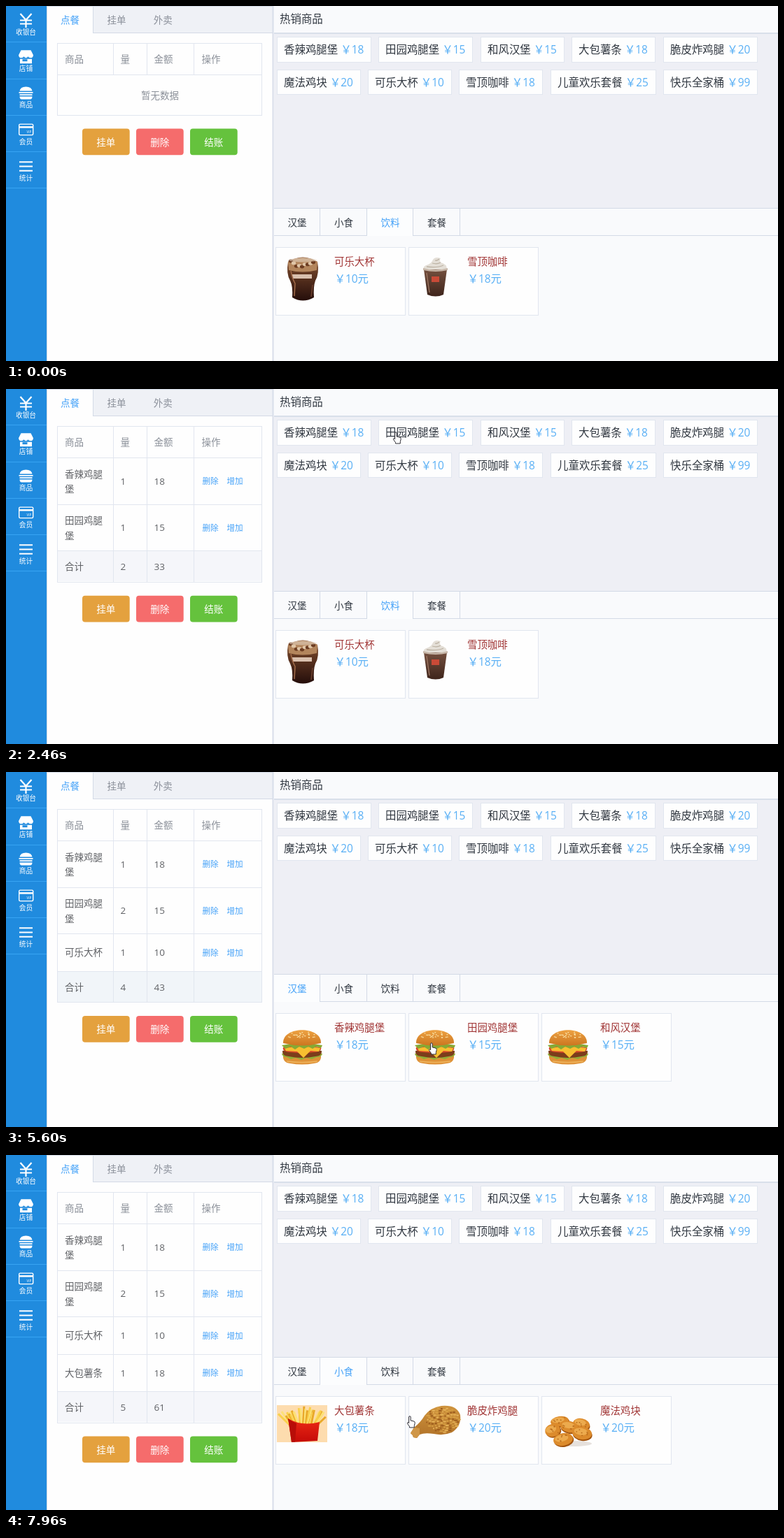
An HTML page for the animation above (8000 ms loop, 1103x508 px).

```html
<!DOCTYPE html>
<html lang="zh-CN">
<head>
<meta charset="utf-8">
<title>收银台</title>
<style>
html, body { margin: 0; width: 100%; height: 100%; overflow: hidden; background: #f9fafc; }
svg { display: block; width: 1103px; height: 508px; }
text { font-family: "Open Sans", "Noto Sans CJK SC", "Noto Sans CJK", sans-serif; white-space: pre; }
</style>
</head>
<body>
<svg id="stage" viewBox="0 0 1103 508"></svg>
<script>
const LOOP = 8000, BEAT = 156.6;
const BLUE = '#45a2f8', SKY = '#58aff5', LINE = '#e1e6ef', EDGE = '#d3dae6', INK = '#303740';

// ---- drawing helpers ----
const rect = (x, y, w, h, fill, extra = '') =>
  `<rect x="${x}" y="${y}" width="${w}" height="${h}" fill="${fill}" ${extra}/>`;
const frame = (x, y, w, h, fill = '#fefefe', stroke = LINE) =>
  rect(x + .5, y + .5, w - 1, h - 1, fill, `stroke="${stroke}"`);
const path = (d, fill, extra = '') => `<path d="${d}" fill="${fill}" ${extra}/>`;
const stroke = (d, color, width = 1, extra = '') =>
  path(d, 'none', `stroke="${color}" stroke-width="${width}" ${extra}`);
const ellipse = (x, y, rx, ry, fill) => `<ellipse cx="${x}" cy="${y}" rx="${rx}" ry="${ry}" fill="${fill}"/>`;
const at = (x, y, body) => `<g transform="translate(${x} ${y})">${body}</g>`;
const label = (x, midY, str, size, fill, anchor = 'start') =>
  `<text x="${x}" y="${midY + size * .37}" font-size="${size}" fill="${fill}" text-anchor="${anchor}">${str}</text>`;
const gradient = (id, top, bottom) =>
  `<linearGradient id="${id}" x2="0" y2="1"><stop stop-color="${top}"/><stop offset="1" stop-color="${bottom}"/></linearGradient>`;
const mix = (a, b, k) => a.map((v, i) => Math.round(v + (b[i] - v) * k));
const noise = n => { const v = Math.sin(n * 127.1) * 43758.5453; return v - Math.floor(v); };
const times = (n, fn) => Array.from({ length: n }, (_, i) => fn(i)).join('');

// ---- food pictures, each drawn from its own top left corner ----
const cola = () =>
  path('M1 7Q22 -6 43 7Q46 24 40 34Q37 42 38 58Q22 67 7 58Q8 42 4 34Q-2 24 1 7Z', 'url(#cola)') +
  path('M1 7Q22 -5 43 7L42 19Q22 24 2 19Z', '#b3855c') +
  times(9, i => ellipse(5 + i * 4, 6 + noise(i) * 9, 3.2, 2.4, i % 2 ? '#e0c6a8' : '#6d3d22')) +
  ellipse(22, 4.5, 20, 3, '#e9d9c988') +
  rect(7, 25, 28, 6, '#d9c0ae') +
  stroke('M5 20Q7 31 11 38L10 56', '#a26b4a', 1.5) + stroke('M36 40L34 57', '#6e4230', 1.5);

const coffee = () =>
  path('M1 17Q-1 12 7 10Q12 8 14 3Q17 -2 25 1Q23 3 25 7Q34 9 34 17Z', '#e4dfd7') +
  stroke('M5 13Q20 15 29 11M13 8Q20 10 25 7M17 4Q20 5 23 2', '#bcb2a4', 1.3) +
  path('M1 17H34L29 53Q18 58 6 53Z', 'url(#coffee)') +
  path('M0 15Q18 20 35 15V18Q18 22 0 18Z', '#c8b8aa') +
  rect(12, 27, 11, 8, '#c94a37') + stroke('M5 22L9 50', '#9b7460', 1.4);

const burger = () =>
  path('M2 36Q29 44 56 36Q57 47 46 48Q29 51 12 48Q1 47 2 36Z', '#de9238') +
  path('M0 34Q29 30 58 34Q57 39 50 39L43 42L35 40L28 43L20 40L13 42L7 39Q1 39 0 34Z', '#8fae36') +
  path('M1 30Q29 24 57 30Q58 37 48 38Q29 42 10 38Q0 37 1 30Z', '#7c3d1b') +
  path('M2 25Q29 20 56 25Q58 31 46 32Q29 34 12 32Q0 31 2 25Z', '#d8482a') +
  path('M4 26Q29 22 55 26L53 31L41 30L31 40L22 31L6 30Z', '#f8bf30') +
  path('M0 22Q29 16 58 22L56 26L49 24L44 27L38 24L32 27L25 24L19 28L13 24L5 27Z', '#86a934') +
  path('M2 19C1 -6 57 -6 56 19Q29 26 2 19Z', 'url(#bun)') +
  times(26, i => ellipse(9 + noise(i + 3) * 40, 3 + noise(i + 40) * 9, 1.2, .7, '#fae0a2')) +
  stroke('M7 45Q29 48 51 45', '#efb45c', 1.5);

const fries = () =>
  rect(0, 0, 72, 53, '#fddcae') +
  times(30, i => {
    const side = (i - 14.5) / 14.5, x = 38 + side * 18, lean = side * 14 + noise(i) * 8 - 4;
    return stroke(`M${x} 30L${x + lean} ${1 + side * side * 9 + noise(i + 9) * 10}`,
      ['#f9d04b', '#fce178', '#e9a929'][i % 3], 3);
  }) +
  path('M16 19Q36 31 61 24L58 51L21 53Z', 'url(#box)') + path('M16 19Q22 24 28 26L26 52.5L21 53Z', '#b80d08');

const drumstick = () =>
  path('M0 40L5 32Q14 25 20 15Q29 3 44 1Q66 -1 71 14Q73 30 59 39Q47 44 33 41Q20 39 13 42L9 47L4 46L3 43Z', 'url(#fried)') +
  path('M0 40L5 32L13 33L13 42L9 47L4 46L3 43Z', '#cf9647') +
  times(90, i => {
    const turn = i * 2.4, reach = Math.sqrt(i / 90);
    return ellipse(46 + Math.cos(turn) * reach * 24, 21 + Math.sin(turn) * reach * 18, 1 + noise(i) * 2, 1.1,
      ['#e6b258', '#9c5c1d', '#d8a044'][i % 3]);
  });

const nugget = (x, y, rx, ry, turn) => `<g transform="translate(${x} ${y}) rotate(${turn})">` +
  ellipse(1, 2, rx, ry, '#a2540f') + ellipse(0, 0, rx, ry, '#dc8b2c') + ellipse(-2, -2, rx * .7, ry * .55, '#ecaa4d') +
  times(7, i => ellipse((noise(i + x) - .5) * rx * 1.4, (noise(i + y) - .5) * ry * 1.3, 1, .8, '#b76a1b')) + '</g>';
const nuggets = () =>
  ellipse(41, 40, 27, 4, '#e6e1dd') + nugget(22, 8, 13, 7, -8) + nugget(53, 12, 12, 8, 12) +
  nugget(36, 16, 13, 8, 10) + nugget(12, 21, 11, 9, -15) + nugget(54, 25, 14, 9, 8) + nugget(27, 34, 14, 9, -10);

// ---- content ----
const price = { 香辣鸡腿堡: 18, 田园鸡腿堡: 15, 和风汉堡: 15, 大包薯条: 18, 脆皮炸鸡腿: 20,
  魔法鸡块: 20, 可乐大杯: 10, 雪顶咖啡: 18, 儿童欢乐套餐: 25, 快乐全家桶: 99 };
const hotX = [387, 532, 678, 808, 939, 387, 517, 647, 778, 939];
const hotItems = Object.keys(price).map((name, i) => ({
  name, x: hotX[i], w: Math.round(58 + name.length * 15.45), ...(i < 5 ? { y: 44, h: 37 } : { y: 91, h: 36 })
}));
const tabs = [
  { name: '汉堡', cards: [['香辣鸡腿堡', burger, 9, 23], ['田园鸡腿堡', burger, 9, 23], ['和风汉堡', burger, 9, 23]] },
  { name: '小食', cards: [['大包薯条', fries, 2, 12], ['脆皮炸鸡腿', drumstick, 3, 12], ['魔法鸡块', nuggets, 4, 27]] },
  { name: '饮料', cards: [['可乐大杯', cola, 17, 13], ['雪顶咖啡', coffee, 21, 14]] },
  { name: '套餐', cards: [] }
];
const tabX = i => Math.round(383 + i * 66.4);
const cardX = i => Math.round(385 + i * 189.8);

// ---- timeline, counted in beats ----
const orders = [['香辣鸡腿堡', 10], ['田园鸡腿堡', 14], ['可乐大杯', 22], ['大包薯条', 48]];
const extraPortion = { name: '田园鸡腿堡', beat: 33 };
const tabSwitches = [[-1, 2], [27, 0], [42, 1]];
const pointerKeys = [
  [0, 849, 147], [2, 700, 240], [4, 480, 320], [5, 369, 338], [6, 425, 300], [8, 433, 200], [10, 447, 70],
  [11, 447, 66], [13, 556, 57], [14, 556, 57], [15, 557, 62], [17, 510, 112], [18, 510, 112], [19, 530, 112],
  [22, 530, 112], [24, 515, 190], [27, 430, 303], [28, 434, 303], [29, 502, 367], [30, 502, 367],
  [32, 608, 388], [37, 608, 388], [40, 540, 345], [42, 481, 309], [44, 481, 303], [46, 430, 360],
  [48, 425, 372], [50, 577, 374]
];

function pointerAt(beat) {
  const n = pointerKeys.findIndex(k => k[0] >= beat);
  const b = pointerKeys[n], a = pointerKeys[Math.max(0, n - 1)];
  const k = a === b ? 0 : (beat - a[0]) / (b[0] - a[0]);
  return { x: a[1] + (b[1] - a[1]) * k, y: a[2] + (b[2] - a[2]) * k };
}

const inside = (p, x, y, w, h) => p.x >= x && p.x < x + w && p.y >= y && p.y < y + h;

// ---- fixed parts ----
const icons = [
  stroke('M-8 -9L0 0L8 -9M0 0V11M-8.5 .5H8.5M-8.5 5.5H8.5', '#fff', 2.2),
  path('M-7 -9H7L10.5 -2Q10 2 7 2Q4 2 3 0Q0 4 -3 0Q-4 2 -7 2Q-10 2 -10.5 -2ZM-8.5 3.5H8.5V10H-8.5Z', '#fff') +
    rect(-5, 4, 7, 3, '#208bde'),
  path('M-9 -3Q-8 -9 0 -9Q8 -9 9 -3ZM-9 5H9Q9 9 6 9H-6Q-9 9 -9 5Z', '#fff') +
    stroke('M-10 -.5H10M-9 2.8H9', '#fff', 1.7),
  `<rect x="-9.8" y="-7.5" width="20" height="15.5" rx="1.5" fill="none" stroke="#fff" stroke-width="1.4"/>` +
    rect(-9.5, -4.5, 19.5, 2.5, '#fff') + label(1, 4, 'VIP', 4.5, '#fff'),
  stroke('M-9.5 -5.5H9.5M-9.5 .7H9.5M-9.5 6.9H9.5', '#fff', 2)
];

function fixedParts() {
  const side = ['收银台', '店铺', '商品', '会员', '统计'].map((name, i) =>
    at(28.5, 20 + i * 52.2, icons[i]) + label(28.5, 37.5 + i * 52.2, name, 9.7, '#fff', 'middle') +
    rect(0, Math.round(51.4 + i * 52.2), 58, 1, '#37a4f3')).join('');
  const leftTabs = ['点餐', '挂单', '外卖'].map((name, i) =>
    label(78 + i * 66.4, 20.5, name, 13.5, i ? '#8c919b' : BLUE)).join('');
  const hot = hotItems.map(({ name, x, y, w, h }) =>
    frame(x, y, w, h) + label(x + 10, y + h / 2, name, 15.45, INK) +
    label(x + 14 + name.length * 15.45, y + h / 2, '￥' + price[name], 15.45, SKY)).join('');
  return '<defs>' + gradient('cola', '#85502f', '#250e0b') + gradient('coffee', '#74503f', '#3e241b') +
    gradient('bun', '#eda243', '#cc7620') + gradient('box', '#ec2a15', '#c50a08') +
    gradient('fried', '#cf943e', '#b07127') + '</defs>' +
    rect(0, 0, 1103, 508, '#f9fafc') +
    rect(58, 0, 323, 508, '#fefefe') + rect(58, 0, 323, 38, '#eff1f6') +
    rect(58, 0, 323, 1, EDGE) + rect(125, 38, 256, 1, EDGE) +
    rect(58, 1, 66, 38, '#fefefe') + rect(124, 0, 1, 39, EDGE) + leftTabs +
    rect(0, 0, 58, 508, '#208bde') + side + rect(58, 0, 1, 508, EDGE) +
    rect(383, 39, 720, 250, '#eeeff5') + rect(383, 38, 720, 2, '#d9dfea') +
    rect(380.5, 0, 2, 508, '#d8dde9') +
    label(391, 18.5, '热销商品', 15.45, INK) + hot;
}

// ---- changing parts ----
function orderTable(beat) {
  const rows = orders.filter(o => beat >= o[1]).map(([name]) => ({
    name, sum: price[name], count: name === extraPortion.name && beat >= extraPortion.beat ? 2 : 1
  }));
  const columns = [84, 163.5, 211.5, 279.5], total = key => rows.reduce((n, r) => n + r[key], 0);
  const cells = (y, values, fill) => values.map((v, i) => label(columns[i], y, v, 13.5, fill)).join('');
  const rule = y => rect(73, Math.round(y), 293, 1, LINE);
  let y = 98.2, out = cells(76.5, ['商品', '量', '金额', '操作'], '#8b9099') + rule(53) + rule(y);
  for (const { name, count, sum } of rows) {
    const wraps = name.length > 4, h = wraps ? 66.6 : 53.4, mid = y + h / 2 + .3;
    out += cells(mid, [wraps ? '' : name, count, sum], '#606266') +
      label(280.5, mid, '删除', 11.6, BLUE) + label(315.5, mid, '增加', 11.6, BLUE);
    if (wraps) out += label(84, mid - 10, name.slice(0, 4), 13.5, '#606266') +
      label(84, mid + 11.5, name.slice(4), 13.5, '#606266');
    y += h;
    out += rule(y);
  }
  if (rows.length) {
    out = rect(73, Math.round(y), 293, 44, rows.length === 3 ? '#f1f5f9' : '#f5f6fa') + out +
      cells(y + 23, ['合计', total('count'), total('sum')], '#606266');
    y += 44.4;
  } else {
    out += label(220, 128.5, '暂无数据', 13.5, '#8b9099', 'middle');
    y += 57.4;
  }
  const bottom = Math.round(y), lineEnd = rows.length ? bottom : 98;
  out += rule(bottom) + [73, 365].map(x => rect(x, 53, 1, bottom - 52, LINE)).join('') +
    [153, 201, 268].map(x => rect(x, 53, 1, lineEnd - 53, LINE)).join('');
  return out + [['挂单', '#e4a13e'], ['删除', '#f56c6c'], ['结账', '#65c23d']].map(([name, fill], i) =>
    rect(109 + i * 77, y + 19.9, 67.7, 37.7, fill, 'rx="4"') +
    label(142.7 + i * 77, y + 39.2, name, 13.5, '#fff', 'middle')).join('');
}

function menu(beat, pointer) {
  const current = tabSwitches.filter(s => beat >= s[0]);
  const [since, active] = current[current.length - 1];
  const previous = current.length > 1 ? current[current.length - 2][1] : -1;
  let out = rect(383, 289, 720, 1, EDGE) + rect(383, 328, 720, 1, EDGE);
  tabs.forEach(({ name }, i) => {
    const x = tabX(i), right = tabX(i + 1);
    const lit = i === active || (pointer && inside(pointer, x, 290, right - x, 38));
    const fade = lit ? 0 : i === previous ? Math.min(1, (beat - since) / 2) : 1;
    if (i === active) out += rect(x, 290, right - x, 39, '#fcfdfe');
    out += rect(right - 1, 290, 1, 39, EDGE) +
      label((x + right) / 2, 310.5, name, 13.5, `rgb(${mix([69, 162, 248], [48, 55, 64], fade)})`, 'middle');
  });
  return out + tabs[active].cards.map(([name, picture, dx, dy], i) => {
    const x = cardX(i);
    return frame(x, 345, 186, 98) + at(x + dx, 346 + dy, picture()) +
      label(x + 84, 366, name, 14.45, '#a03434') +
      label(x + 84.5, 390.5, `￥${price[name]}元`, 15.45, SKY);
  }).join('');
}

function cursor(beat, p) {
  const onItem = hotItems.some(i => inside(p, i.x, i.y, i.w, i.h)) || inside(p, 383, 290, 265, 38);
  const tab = tabSwitches.filter(s => beat >= s[0]).pop()[1];
  const onCard = tabs[tab].cards.some((_, i) => inside(p, cardX(i), 346, 185, 96));
  const shape = onItem || onCard
    ? 'M-1.4 1C-1.4 -.7 1.2 -.7 1.2 1V6L5 6.8Q7.4 7.3 7.3 9.4L6.3 13.5V16H-.5V14.5L-3.3 10.5Q-3.8 8.4 -2.5 8.6L-1.4 9.8Z'
    : 'M0 0V14L3.2 11L5.5 16L7.5 15L5.4 10.2H9.8Z';
  return at(p.x, p.y, path(shape, '#fff', 'stroke="#2b2b33" stroke-width="1" stroke-linejoin="round"'));
}

const stage = document.getElementById('stage');
stage.innerHTML = fixedParts() + '<g id="live"></g>';
const live = document.getElementById('live');
let shown = null;

function render(time) {
  const beat = Math.floor((time - 100) / BEAT);
  if (beat === shown) return;
  shown = beat;
  const pointer = beat < 0 ? null : pointerAt(beat);
  live.innerHTML = orderTable(beat) + menu(beat, pointer) + (pointer ? cursor(beat, pointer) : '');
}

function tick() {
  render(performance.now() % LOOP);
  requestAnimationFrame(tick);
}
tick();
</script>
</body>
</html>
```
